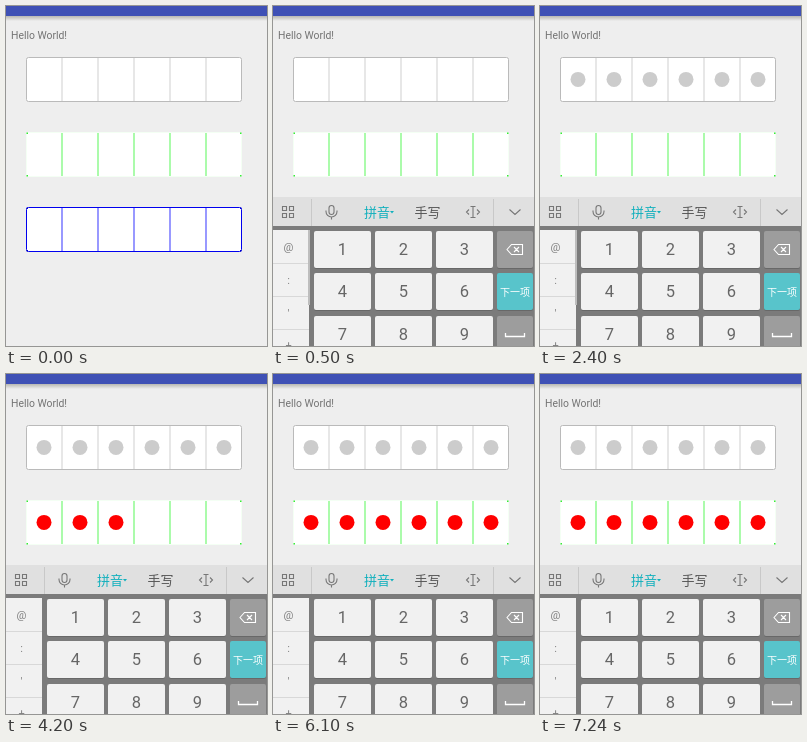
An HTML page that plays this animation: 261 px wide and 340 px high, repeating every 8000 ms.

```html
<!DOCTYPE html>
<html lang="zh">
<head>
<meta charset="utf-8">
<style>
  html, body { margin: 0; width: 100%; height: 100%; overflow: hidden; background: #eee; }
  svg { display: block; width: 261px; height: 340px; }
  text { font-family: Roboto, "Noto Sans CJK SC", "Noto Sans CJK", sans-serif; }
  .key { font-size: 16.5px; fill: #666; text-anchor: middle; }
  .side { font-size: 11px; fill: #808080; text-anchor: middle; }
  .line { fill: none; stroke: #777; stroke-width: 1.1; }
</style>
</head>
<body>
<svg viewBox="0 0 261 340">
  <defs>
    <linearGradient id="shade" x2="0" y2="1">
      <stop stop-color="#b8b8b2"/>
      <stop offset="1" stop-color="#eee"/>
    </linearGradient>
  </defs>
  <rect width="261" height="340" fill="#eee"/>
  <rect y="10" width="261" height="5" fill="url(#shade)"/>
  <rect width="261" height="10" fill="#3f51b5"/>
  <text x="5" y="33" font-size="10.4" fill="#737373">Hello World!</text>
  <g id="fields"></g>
  <g id="keyboard">
    <rect y="191" width="261" height="149" fill="#7b7b7b"/>
    <rect y="191" width="261" height="29" fill="#e0e0e0"/>
    <path d="M38.5 193V220M220.5 193V220" stroke="#c8c8c8"/>
    <path class="line" d="M9.500 200.500h4v4h-4zM16.500 200.500h4v4h-4zM9.500 207.500h4v4h-4zM16.500 207.500h4v4h-4z"/>
    <rect class="line" x="56" y="199.5" width="5" height="9" rx="2.5"/>
    <path class="line" d="M53 204.5v1a5.5 5.5 0 0 0 11 0v-1M58.5 211v2.5"/>
    <text x="91" y="210.5" font-size="13" font-weight="500" fill="#12b0bd">拼音</text>
    <path d="M117 205h4l-2 2.5z" fill="#12b0bd"/>
    <text x="141.5" y="210.5" font-size="13" fill="#555">手写</text>
    <path class="line" d="M196 203.5l-2.5 2.500 2.500 2.500M204 203.500l2.500 2.500-2.500 2.500M197.500 200.500h5M200 200.500v11M197.500 211.500h5M236.500 203.500l5.500 5 5.500-5"/>
    <rect y="224" width="36" height="116" fill="#f1f1f1"/>
    <path d="M0 257.5H36M0 290.5H36M0 323.5H36" stroke="#d8d8d8"/>
    <text class="side" x="15.5" y="245">@</text>
    <text class="side" x="15.5" y="278">:</text>
    <text class="side" x="15.5" y="311">'</text>
    <text class="side" x="15.5" y="343">+</text>
    <rect id="thumb" x="35" y="224" width="2" height="75" fill="#bdbdbd"/>
    <g id="keys"></g>
    <path d="M234 243.5l4.5-5h11v10h-11zM241 241l5 5M246 241l-5 5" fill="none" stroke="#fff" stroke-width="1.1"/>
    <text x="242" y="290" font-size="10" font-weight="500" fill="#fff" text-anchor="middle">下一项</text>
    <path d="M232.5 327v3.5h19V327" fill="none" stroke="#fff" stroke-width="1.3"/>
  </g>
</svg>
<script>
const $ = id => document.getElementById(id);

function add(parent, tag, attrs, text = "") {
  const el = document.createElementNS("http://www.w3.org/2000/svg", tag);
  for (const name in attrs) el.setAttribute(name, attrs[name]);
  el.textContent = text;
  return parent.appendChild(el);
}

// Draws a six-cell box and returns its dots.
function field(y, border, divider, dotColor) {
  const g = $("fields");
  add(g, "rect", { x: 20.5, y: y + .5, width: 215, height: 44, rx: 2, fill: "#fff", stroke: border });
  for (let i = 1; i < 6; i++)
    add(g, "path", { d: `M${20 + 36 * i} ${y + 1}v43`, stroke: divider, "stroke-width": 1.1 });
  return [0, 1, 2, 3, 4, 5].map(i =>
    add(g, "circle", { cx: 38 + 36 * i, cy: y + 22.4, r: 7.5, fill: dotColor, visibility: "hidden" }));
}

function corners(y, color) {
  for (const dx of [0, 213.5])
    for (const dy of [0, 42.5])
      add($("fields"), "rect", { x: 20.5 + dx, y: y + .5 + dy, width: 1.5, height: 1.5, fill: color });
}

const grayDots = field(51, "#bababa", "#d3d3d3", "#ccc");
const redDots = field(126, "#f4fff4", "#66f766", "#f00");
corners(126, "#3e3");
field(201, "#00e", "#44f", "#00f");
corners(201, "#00c");

for (let row = 0; row < 3; row++) {
  const y = Math.round(225 + 42.4 * row);
  const key = (x, width, fill) => {
    add($("keys"), "rect", { x, y: y + 1, width, height: 37, rx: 2, fill: "#686868" });
    add($("keys"), "rect", { x, y, width, height: 37, rx: 2, fill });
  };
  for (let col = 0; col < 3; col++) {
    const x = 41 + 61 * col;
    key(x, 57, "#f1f1f1");
    add($("keys"), "text", { class: "key", x: x + 28.5, y: y + 24.3 }, row * 3 + col + 1);
  }
  key(224, 36, row === 1 ? "#58c4cb" : "#9d9d9d");
}

const show = (el, on) => el.setAttribute("visibility", on ? "visible" : "hidden");
const fill = (dots, count) => dots.forEach((dot, i) => show(dot, i < count));

function draw(now) {
  const t = now % 8000;
  show($("keyboard"), t >= 500);
  show($("thumb"), t >= 500 && t < 4200);
  fill(grayDots, t < 2400 ? 0 : 6);
  fill(redDots, t < 4200 ? 0 : t < 6100 ? 3 : 6);
}

const start = performance.now();
function tick() {
  draw(performance.now() - start);
  requestAnimationFrame(tick);
}
tick();
</script>
</body>
</html>
```
